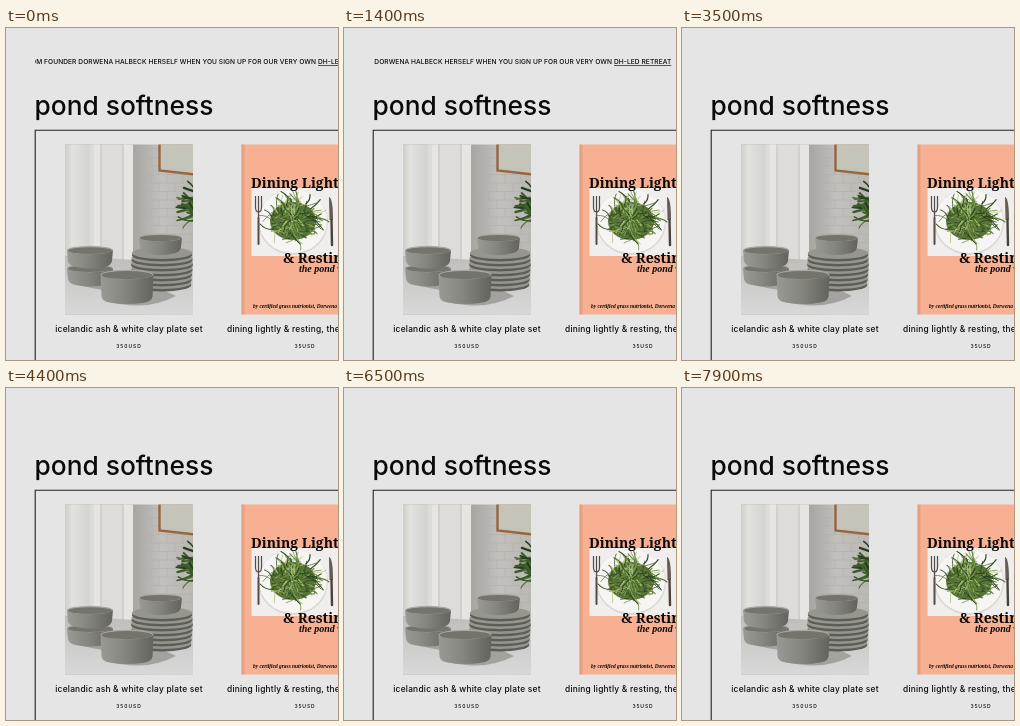
An HTML page that plays this animation: 332 by 332 pixels, repeating every 8 s.

```html
<!DOCTYPE html>
<html lang="en">
<head>
<meta charset="utf-8">
<title>pond softness</title>
<style>
  html, body { margin: 0; width: 100%; height: 100%; overflow: hidden; background: #e5e5e5; }
  svg { display: block; width: 100vw; height: 100vh; }
  text { font-family: Inter, "Open Sans", sans-serif; font-weight: 500; fill: #0a0a0a; white-space: pre; }
  .news { font-size: 6.6px; letter-spacing: .08px; }
  .title { font-size: 26.3px; }
  .name { font-size: 8.4px; letter-spacing: .23px; }
  .price { font-size: 5px; letter-spacing: .9px; text-anchor: middle; }
  .cover { font: 900 14px "Noto Serif", serif; }
  .script { font: italic bold 10px "Liberation Serif", serif; }
  .by { font: italic bold 5.4px "Liberation Serif", serif; }
</style>
</head>
<body>
<svg viewBox="0 0 332 332">
  <defs>
    <clipPath id="newsBox"><path d="M29 25H332V45H29Z"/></clipPath>
    <clipPath id="photoBox"><path d="M59 116.5H187V286.5H59Z"/></clipPath>
    <linearGradient id="window">
      <stop offset="0" stop-color="#cfcfc9"/><stop offset=".25" stop-color="#e2e2de"/>
      <stop offset=".8" stop-color="#d3d3cf"/><stop offset="1" stop-color="#e4e4e1"/>
    </linearGradient>
    <linearGradient id="wall">
      <stop offset=".55" stop-color="#a9a7a2"/><stop offset=".75" stop-color="#c2c0bc"/><stop offset="1" stop-color="#bab8b3"/>
    </linearGradient>
    <linearGradient id="table" x2="0" y2="1">
      <stop offset="0" stop-color="#bdbcb8"/><stop offset=".5" stop-color="#cdcecc"/><stop offset="1" stop-color="#d7d8d7"/>
    </linearGradient>
    <linearGradient id="clay">
      <stop offset="0" stop-color="#999a93"/><stop offset=".45" stop-color="#85867f"/><stop offset="1" stop-color="#63635d"/>
    </linearGradient>
  </defs>

  <g id="news" clip-path="url(#newsBox)">
    <g id="strip">
      <text class="news" x="-2" y="36.2" text-anchor="end">FROM FOUNDER DORWENA HALBECK HERSELF WHEN YOU SIGN UP FOR OUR VERY OWN</text>
      <text class="news" y="36.2" text-decoration="underline">DH-LED RETREAT</text>
    </g>
  </g>

  <text class="title" x="28.5" y="86.5">pond softness</text>
  <path d="M332 102.2H29.2V332" fill="none" stroke="#222" stroke-width="1.1"/>

  <g id="photo" clip-path="url(#photoBox)">
    <path d="M59 116H187V287H59Z" fill="url(#wall)"/>
    <path d="M59 116H88V235H59Z" fill="url(#window)"/>
    <path d="M86 116H121V235H86Z" fill="#dddcd8"/>
    <path d="M88 116H94V235H88ZM118 116H127V235H118Z" fill="#e6e5e2"/>
    <path d="M95 116V235M117 116V235" stroke="#c3c2be"/>
    <path id="bricks" fill="none" stroke="#b3b0ab" stroke-width=".6"/>
    <path d="M153.5 115V142.5L190 146.5V115Z" fill="#c5c4b9" stroke="#96663f" stroke-width="2.4"/>
    <path d="M59 228L130 232L187 228V287H59Z" fill="url(#table)"/>
    <g id="plant"></g>
    <path d="M64 254Q100 266 112 260L104 248ZM100 273Q140 284 170 268L145 256Z" fill="#a3a29e"/>
    <g id="dishes"></g>
  </g>

  <g id="book">
    <path d="M235.5 116.5H332V286.5H235.5Z" fill="#f7b091"/>
    <path d="M235.5 116.5H238.5V286.5H235.5Z" fill="#e8a083"/>
    <path d="M245.5 160H332V228H245.5Z" fill="#efeeec"/>
    <ellipse cx="287" cy="194" rx="35" ry="33" fill="#dbd9d5"/>
    <ellipse cx="287" cy="193" rx="34" ry="32" fill="#f6f5f3"/>
    <ellipse cx="287" cy="193" rx="23" ry="19" fill="#58733a"/>
    <g id="greens"></g>
    <path d="M249.5 168V179Q249.5 184 252.5 184Q255.5 184 255.5 179V168M252.5 168V191" fill="none" stroke="#574c45" stroke-width="1.2"/>
    <path d="M252.5 190V216" stroke="#574c45" stroke-width="2" stroke-linecap="round"/>
    <path d="M323 169Q327 170 327 192H323.5Z" fill="#665b55"/>
    <path d="M325.5 192L326 217" stroke="#4b403b" stroke-width="2.4" stroke-linecap="round"/>
    <text class="cover" x="245" y="160">Dining Lightly</text>
    <text class="cover" x="277" y="234.5">&amp; Resting</text>
    <text class="script" x="293" y="244">the pond way</text>
    <text class="by" x="247" y="279.5">by certified grass nutrionist, Dorwena</text>
  </g>

  <text class="name" x="123" y="304" text-anchor="middle">icelandic ash &amp; white clay plate set</text>
  <text class="price" x="123" y="319.6">350USD</text>
  <text class="name" x="221" y="304">dining lightly &amp; resting, the book</text>
  <text class="price" x="299" y="319.6">35USD</text>
</svg>
<script>
const $ = id => document.getElementById(id);

let seed = 7;
const rand = (a, b) => {
  seed = (seed * 16807) % 2147483647;
  return a + (b - a) * seed / 2147483647;
};

function add(parent, tag, attrs) {
  const el = document.createElementNS("http://www.w3.org/2000/svg", tag);
  for (const key in attrs) el.setAttribute(key, attrs[key]);
  $(parent).append(el);
}

// Straight-sided bowl with a rounded foot; y is the middle of its rim
function bowl(x, y, w, h) {
  const r = w / 2, ry = w * .09, cx = x + r, base = y + h;
  add("dishes", "path", {
    d: `M${x} ${y}L${x + 1} ${base - 5}Q${x + 2} ${base} ${x + 9} ${base + 1}Q${cx} ${base + 4} ${x + w - 9} ${base + 1}Q${x + w - 2} ${base} ${x + w - 1} ${base - 5}L${x + w} ${y}Z`,
    fill: "url(#clay)"
  });
  add("dishes", "ellipse", { cx, cy: y, rx: r, ry, fill: "#a9a8a1" });
  add("dishes", "ellipse", { cx, cy: y + .6, rx: r - 1, ry: ry - .7, fill: "#74746d" });
}

function plate(y, w) {
  add("dishes", "ellipse", { cx: 156, cy: y + 2, rx: w, ry: 6.5, fill: "#5c5d57" });
  add("dishes", "ellipse", { cx: 156, cy: y, rx: w, ry: 6, fill: "#96968f" });
}

// Curved blades growing out of a point
function blade(parent, x, y, angle, length, width, color) {
  const bend = rand(-.5, .5);
  const at = (a, k) => `${x + Math.cos(a) * length * k} ${y + Math.sin(a) * length * k}`;
  add(parent, "path", {
    d: `M${x} ${y}Q${at(angle + bend, .6)} ${at(angle, 1)}`,
    fill: "none", stroke: color, "stroke-width": width, "stroke-linecap": "round"
  });
}

let bricks = "";
for (let row = 0; row < 13; row++) {
  const y = 121 + row * 8.5;
  bricks += `M132 ${y}H187`;
  for (let x = 137 + row % 2 * 8; x < 187; x += 16) bricks += `M${x} ${y}v8.5`;
}
$("bricks").setAttribute("d", bricks);

const leafColors = ["#263d22", "#3c5a2c", "#557238"];
for (let i = 0; i < 26; i++)
  blade("plant", 190, rand(164, 194), rand(2.3, 4.2), rand(10, 22), rand(1.2, 2.6), leafColors[i % 3]);

for (let i = 6; i >= 0; i--) plate(225 + i * 5, 31 - Math.abs(i - 2) * .4);
bowl(133, 209.5, 43, 15);
bowl(61, 240, 46, 16);
bowl(61, 222, 46, 16);
bowl(94.5, 246.5, 53, 27);

const grassColors = ["#38551f", "#56792f", "#7b9b4b", "#a8bd78", "#2c451c"];
for (let i = 0; i < 210; i++) {
  const a = rand(0, 6.28), r = rand(0, 23);
  blade("greens", 287 + Math.cos(a) * r, 192 + Math.sin(a) * r * .85,
    a + rand(-1.4, 1.4), rand(6, 15), rand(.5, 1.2), grassColors[i % 5]);
}

const LOOP = 8000, NEWS_END = 1700, STEP = 100;
function draw(now) {
  const t = now % LOOP;
  $("news").style.display = t < NEWS_END ? "" : "none";
  $("strip").setAttribute("transform", `translate(${312 - 3 * Math.floor(t / STEP)} 0)`);
  requestAnimationFrame(draw);
}
draw(performance.now());
</script>
</body>
</html>
```
